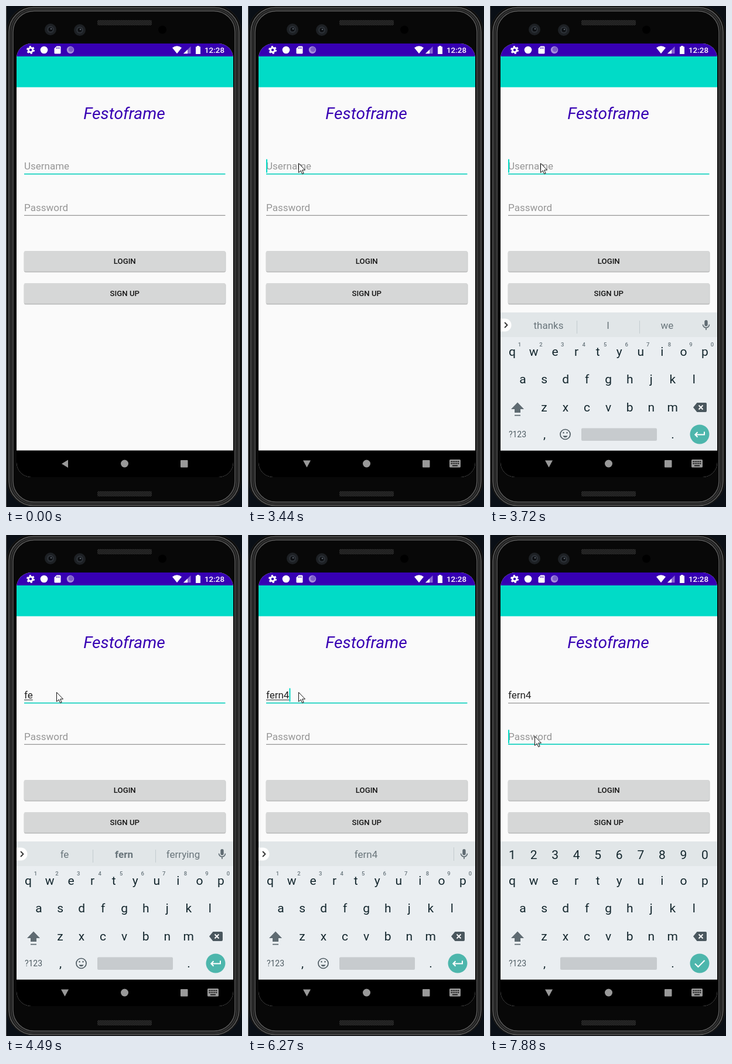
An HTML page for the animation above (8000 ms loop, 403 px wide and 855 px high).

```html
<!DOCTYPE html>
<html lang="en">
<head>
<meta charset="utf-8">
<title>Login screen</title>
<style>
  html, body { margin: 0; width: 100%; height: 100%; overflow: hidden; background: #0a0f16; }
  svg { display: block; width: 100%; height: 100%; }
  text { font-family: Roboto, "Open Sans", sans-serif; }
  .mid { text-anchor: middle; }
  .field { font-size: 17px; fill: #212121; }
  .hint { fill: #969696; }
  .btn { font-size: 13.2px; font-weight: 500; fill: #151515; }
  .key { font-size: 21px; fill: #14272e; }
  .sup { font-size: 9.5px; font-weight: 500; fill: #68757c; }
  .sug { font-size: 17px; fill: #69757b; }
</style>
</head>
<body>
<svg viewBox="0 0 403 855">
  <defs>
    <pattern id="mesh" width="3" height="3" patternUnits="userSpaceOnUse">
      <rect width="3" height="3" fill="#161616"/>
      <path d="M0 3L3 0" stroke="#3c3c3c"/>
    </pattern>
    <clipPath id="screen"><rect x="18" y="64" width="370" height="740" rx="25"/></clipPath>
    <g id="lens">
      <circle r="10" fill="#1d2024"/>
      <circle r="6" fill="#2b3036"/>
      <circle r="3.5" fill="#0c0e11"/>
      <circle cx="1" cy="-1" r="1.3" fill="#59616b"/>
    </g>
    <g id="button">
      <rect x="31" y="1.5" width="344" height="35" rx="2.5" fill="#b4b5b5"/>
      <rect x="30.5" y="1" width="345" height="34.5" rx="2.5" fill="#c9caca"/>
      <rect x="31" width="343.5" height="34.5" rx="2" fill="#d6d7d7"/>
    </g>
  </defs>

  <!-- phone body -->
  <path d="M.5 0V855" stroke="#555"/>
  <rect x="1.5" y="-1" width="400" height="855" rx="45" fill="#0c0c0c" stroke="#1c1c1c"/>
  <rect x="5" y="2.5" width="393" height="850" rx="42" fill="#1a1a1a" stroke="#5c5c5c" stroke-width="1.6"/>
  <rect x="8.5" y="5.5" width="386" height="844" rx="39" fill="none" stroke="#333" stroke-width="2"/>
  <rect x="12" y="8.5" width="379" height="838" rx="36" fill="#080808" stroke="#5c5c5c" stroke-width="1.4"/>
  <rect x="156" y="24" width="93" height="9" rx="2" fill="url(#mesh)"/>
  <rect x="156" y="828" width="93" height="9" rx="2" fill="url(#mesh)"/>
  <use href="#lens" x="76" y="40"/>
  <use href="#lens" x="126" y="41"/>
  <circle cx="267" cy="40.5" r="7" fill="#000"/>

  <g clip-path="url(#screen)">
    <rect x="18" y="64" width="370" height="740" fill="#fafafa"/>
    <rect x="18" y="64" width="370" height="22" fill="#3700b3"/>
    <rect x="18" y="86" width="370" height="52.6" fill="#01dbc7"/>
    <rect x="18" y="758.5" width="370" height="46"/>

    <!-- status bar -->
    <g fill="#fff">
      <circle cx="42" cy="75" r="3.7" fill="none" stroke="#fff" stroke-width="3"/>
      <circle cx="42" cy="75" r="5.8" fill="none" stroke="#fff" stroke-width="2.4" stroke-dasharray="3.04"/>
      <circle cx="65" cy="75" r="6.3"/>
      <path d="M86.5 68.5H92q1.5 0 1.5 1.5V80q0 1.5-1.5 1.5H84q-1.5 0-1.5-1.5V72.5Z"/>
      <path d="M86.5 70.5v2.5M88.8 70.5v2.5M91 70.5v2.5" stroke="#3700b3"/>
      <circle cx="110" cy="75" r="6.2" fill="#a58edb"/>
      <circle cx="111" cy="74" r="4.3" fill="#7d5fc9"/>
      <path d="M284 71.2Q292 65.5 300 71.2L292 81.3Z"/>
      <path d="M315.5 69V81.3H303Z" opacity=".4"/>
      <path d="M310 74.5V81.3H303Z"/>
      <path d="M326 68h4v1.5h2V82h-8V69.5h2Z"/>
      <text x="339" y="79.7" font-size="13.4" font-weight="500">12:28</text>
    </g>

    <!-- form -->
    <text class="mid" x="202" y="193" font-size="28.25" font-style="italic" fill="#3700b3">Festoframe</text>
    <text id="user" class="field" x="31" y="279.4"></text>
    <text class="field hint" x="31" y="350">Password</text>
    <rect id="compose" x="31" y="281" height="1" fill="#333"/>
    <rect id="line0" x="31" width="343.5"/>
    <rect id="line1" x="31" width="343.5"/>
    <rect id="caret" width="2" height="23" fill="#03dac5"/>
    <use href="#button" y="418"/>
    <use href="#button" y="473"/>
    <text class="btn mid" x="202.8" y="440">LOGIN</text>
    <text class="btn mid" x="202.8" y="495">SIGN UP</text>

    <!-- navigation -->
    <g fill="#999">
      <path id="back"/>
      <circle cx="202.5" cy="781" r="6.5"/>
      <rect x="298" y="775" width="12.5" height="12.5" rx="1"/>
      <g id="switcher">
        <rect x="344" y="774" width="19" height="13.5" rx="1.5"/>
        <path d="M346.5 777.5h15M346.5 780.8h15" stroke="#000" stroke-width="1.8" stroke-dasharray="1.8 1.2"/>
        <path d="M349 784.5h9" stroke="#000" stroke-width="1.6"/>
      </g>
    </g>

    <!-- keyboard -->
    <g id="board">
      <rect x="18" y="523" width="370" height="235.5" fill="#eaeef1"/>
      <rect x="18" y="523" width="370" height="42" fill="#e1e6e8"/>
      <g id="keys"></g>
      <g id="strip">
        <path d="M18 533.5H25.5a11 11 0 0 1 0 22H18Z" fill="#fff"/>
        <path d="M25 540l4.5 4.5l-4.5 4.5" fill="none" stroke="#333" stroke-width="1.8"/>
        <path id="bars" stroke="#c3cbcf"/>
        <rect x="366.3" y="536" width="5.4" height="10.5" rx="2.7" fill="#5f6b72"/>
        <path d="M363.5 543.5a5.5 5.5 0 0 0 11 0M369 549v4" fill="none" stroke="#5f6b72" stroke-width="1.6"/>
      </g>
      <path d="M47 676.5L58 688H52V694H42V688H36ZM42 697.8h10v1.8h-10Z" fill="#5f6b72"/>
      <path d="M353.5 677H368q2 0 2 2V691q0 2-2 2H353.5L347 685Z" fill="#4a575e"/>
      <path d="M356.5 681.5l7 7m0-7l-7 7" stroke="#fff" stroke-width="1.8"/>
      <text class="mid" x="47" y="736" font-size="14" fill="#4f5c63">?123</text>
      <rect id="space" y="720.5" height="21.5" rx="2" fill="#c7cbce"/>
      <g id="smile" fill="none" stroke="#4f5c63" stroke-width="1.7">
        <circle cx="128.5" cy="731" r="8.5"/>
        <path d="M124.3 733.5a4.6 4.6 0 0 0 8.4 0Z" fill="#4f5c63" stroke="none"/>
        <path d="M125.5 727v2.5M131.5 727v2.5" stroke-width="2"/>
      </g>
      <circle cx="358" cy="731" r="16.5" fill="#4db6ac"/>
      <path id="enter" fill="none" stroke="#fff" stroke-width="2"/>
    </g>
  </g>

  <path id="mouse" d="M.5 .5V16.3L4.2 12.9L6.7 18.6L9.1 17.5L6.6 12H11.5Z" fill="#fff" stroke="#111"/>
</svg>
<script>
const LOOP = 8000;
const $ = id => document.getElementById(id);
const set = (id, attrs) => { for (const k in attrs) $(id).setAttribute(k, attrs[k]); };
const show = (id, on) => set(id, { visibility: on ? "inherit" : "hidden" });

function label(parent, cls, x, y, str) {
  const el = document.createElementNS("http://www.w3.org/2000/svg", "text");
  el.setAttribute("class", cls + " mid");
  el.setAttribute("x", x);
  el.setAttribute("y", y);
  el.textContent = str;
  $(parent).append(el);
  return el;
}
const row = (parent, cls, str, x, y) =>
  [...str].map((c, i) => label(parent, cls, x + 36.55 * i, y, c));

row("keys", "key", "qwertyuiop", 38, 596.5);
row("keys", "key", "asdfghjkl", 56, 643.5);
row("keys", "key", "zxcvbnm", 92.5, 691.5);
row("keys", "key", ",", 93, 738);
row("keys", "key", ".", 312, 738);
const supers = row("keys", "sup", "1234567890", 50.5, 581);
const digits = row("keys", "key", "1234567890", 38, 553);
const words = [100, 201.5, 302.5].map(x => label("strip", "sug", x, 551, ""));

// [start, value] lists; the last entry already started is current
const at = (list, t) => list.filter(e => e[0] <= t).pop()[1];

const typed = [[0, ""], [3870, "f"], [4020, "fe"], [4790, "fer"], [5220, "fern"], [6270, "fern4"]];
const hints = [
  [0, ["thanks", "I", "we"]],
  [3870, ["f", "for", "friends"]],
  [4020, ["fe", "fern", "ferrying"]],
  [4790, ["fer", "fern", "ferrying"]],
  [5220, ["ferns", "fern", "ferny"]],
  [6270, ["", "fern4", ""]]
];
const mouse = [[0, [-50, -50]], [770, [326, 251]], [890, [214, 262]], [1010, [118, 273]],
  [1140, [86, 268]], [6430, [76, 343]]];
const blinks = [470, 1010, 1440, 1870, 2460, 2890, 3290, 4490, 4790, 5650, 6270, 7290, 7880];

function line(id, y, focused) {
  set(id, focused ? { y: y - .5, height: 1.6, fill: "#03cfbc" } : { y, height: 1, fill: "#7d7d7d" });
}

function draw(t) {
  const name = at(typed, t), second = t >= 6700, secret = t >= 6850;
  const open = t >= 3440, settled = t >= 3720;

  $("user").textContent = name || "Username";
  set("user", { class: name ? "field" : "field hint" });
  const width = name ? $("user").getComputedTextLength() : 0;
  set("compose", { width: second ? 0 : width });
  line("line0", 286.4, !second);
  line("line1", 356.8, second);
  set("caret", { x: second ? 31 : 31 + width, y: second ? 332.5 : 261.5 });
  show("caret", blinks.filter(b => b <= t).length % 2);

  set("back", { d: open ? "M94 775.5H107L100.5 787.5Z" : "M106 774.5V788L95 781.2Z" });
  show("switcher", open);

  show("board", t >= 3590);
  set("board", { transform: `translate(0 ${settled ? 0 : 4})`, opacity: settled ? 1 : .9 });
  show("strip", !secret);
  show("smile", !secret);
  supers.forEach(e => e.setAttribute("visibility", secret ? "hidden" : "inherit"));
  digits.forEach(e => e.setAttribute("visibility", secret ? "inherit" : "hidden"));
  const tips = at(hints, t), single = !tips[0];
  words.forEach((e, i) => e.textContent = tips[i]);
  words[1].setAttribute("font-weight", name && !single ? 700 : 400);
  set("bars", { d: single ? "M351.5 533V556" : "M148.5 537V559M255.5 537V559" });
  set("space", { x: secret ? 120 : 156, width: secret ? 165 : 129 });
  set("enter", { d: secret ? "M350 731.5L355.5 737L366.5 726"
    : "M366 726.5V731.5H350.5M354.5 727.3L350.3 731.5L354.5 735.7" });

  set("mouse", { transform: `translate(${at(mouse, t)})` });
}

function tick(now) {
  draw(now % LOOP);
  requestAnimationFrame(tick);
}
draw(0);
requestAnimationFrame(tick);
</script>
</body>
</html>
```
